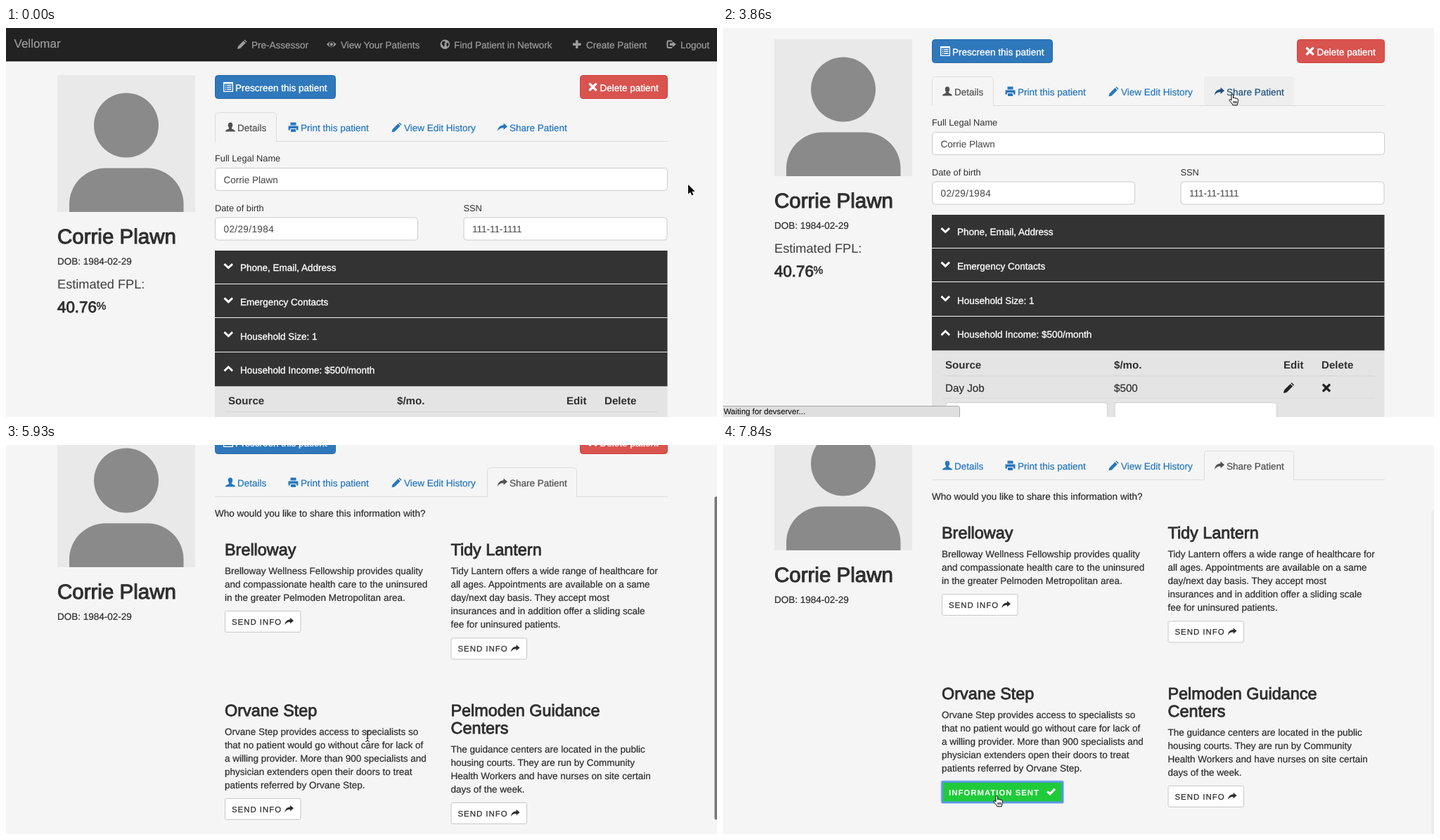
Animation of 1011 by 554 pixels, one loop 8000 ms. Source, as an HTML page:

```html
<!DOCTYPE html>
<html lang="en">
<head>
<meta charset="utf-8">
<title>Patient sharing</title>
<style>
  html, body { margin: 0; width: 100%; height: 100%; overflow: hidden; background: #f5f5f5; }
  svg { display: block; width: 100vw; height: 100vh; }
  text { font-family: "Liberation Sans", Arial, sans-serif; text-rendering: geometricPrecision; white-space: pre; }
</style>
</head>
<body>
<svg id="stage" viewBox="0 0 1011 554" xmlns="http://www.w3.org/2000/svg"></svg>
<script>
const LOOP = 8000;
const BG = '#f5f5f5', INK = '#2f2f2f', LINK = '#2677be', MUTED = '#9d9d9d';
const PERSON = 'Corrie Plawn';

// Icons live in a 14 x 14 box.
const ICONS = {
  pencil: 'M0 14L1 9.8L9 1.8L12.2 5L4.2 13ZM9.8 1L11 0L14 3L13 4.2Z',
  eye: 'M0 7Q7-1.5 14 7Q7 15.5 0 7ZM7 3.4A3.6 3.6 0 1 0 7 10.6A3.6 3.6 0 1 0 7 3.4ZM7 4.8A2.2 2.2 0 1 0 7 9.2A2.2 2.2 0 1 0 7 4.8Z',
  globe: 'M7 0A7 7 0 1 0 7 14A7 7 0 1 0 7 0ZM3 3L6 2L8 4L6 5.5L6.5 8L5 11L3.5 8L2 6ZM9.5 5H12L12.5 8L10 11L9 8Z',
  plus: 'M5.2 1H8.8V5.2H13V8.8H8.8V13H5.2V8.8H1V5.2H5.2Z',
  exit: 'M8 1H2.5Q0 1 0 3.5V10.5Q0 13 2.5 13H8V11H3Q2 11 2 10V4Q2 3 3 3H8ZM8.5 2.8L14 7L8.5 11.2V8.8H4.5V5.2H8.5Z',
  list: 'M0 0H14V14H0ZM1.3 2.5V12.7H12.7V2.5Z' +
    [4, 6.8, 9.6].map(y => `M2.8 ${y}h1.4v1.3h-1.4zM5.2 ${y}h6.2v1.3h-6.2z`).join(''),
  cross: 'M3 .8L7 4.6L11 .8L13.2 3L9.4 7L13.2 11L11 13.2L7 9.4L3 13.2L.8 11L4.6 7L.8 3Z',
  user: 'M7 0C9.4 0 10.4 1.8 10.2 4C10 6.2 9 7.2 8.8 8.4C9.5 9.8 14 10 14 13H0C0 10 4.5 9.8 5.2 8.4C5 7.2 4 6.2 3.8 4C3.6 1.8 4.6 0 7 0Z',
  print: 'M3 0H11V4H3ZM0 5H14V11H11.5V8.5H2.5V11H0ZM3.5 9.5H10.5V13.5H3.5Z',
  share: 'M8.5 1L14 5.8L8.5 10.6V7.8C4.5 7.6 2 9 0 12.5C.2 7.5 3.5 4 8.5 3.8Z',
  down: 'M2 2.5L7 7.2L12 2.5L14 4.8L7 11.5L0 4.8Z',
  up: 'M2 11.5L7 6.8L12 11.5L14 9.2L7 2.5L0 9.2Z',
  check: 'M0 7.5L2.4 5L5.2 7.8L11.6 1.4L14 3.8L5.2 12.6Z'
};

const icon = (name, x, y, fill = INK, size = 14) =>
  `<path d="${ICONS[name]}" fill="${fill}" fill-rule="evenodd" transform="translate(${x} ${y}) scale(${size / 14})"/>`;

// heavy: outline width that thickens the strokes of the letters
const text = (x, y, str, size = 13.5, fill = INK, heavy = .22, extra = '') =>
  `<text x="${x}" y="${y}" font-size="${size}" fill="${fill}"` +
  (heavy ? ` stroke="${fill}" stroke-width="${heavy}"` : '') + ` ${extra}>${str}</text>`;

const rect = (x, y, w, h, fill, extra = '') =>
  `<rect x="${x}" y="${y}" width="${w}" height="${h}" fill="${fill}" ${extra}/>`;

// Bordered box whose outer edge is the given rectangle.
const box = (x, y, w, h, fill, line, r = 4, extra = '') =>
  rect(x + .5, y + .5, w - 1, h - 1, fill, `stroke="${line}" rx="${r}" ${extra}`);

const rule = (x1, x2, y, color) => rect(x1, y, x2 - x1, 1, color);

function header() {
  const nav = [
    ['pencil', 329, 349, 'Pre-Assessor'], ['eye', 456, 476, 'View Your Patients'],
    ['globe', 617.5, 637, 'Find Patient in Network'], ['plus', 805, 825, 'Create Patient'],
    ['exit', 939.5, 959, 'Logout']
  ];
  return rect(0, 0, 1011, 47, '#222') + rule(0, 1011, 46.5, '#0c0c0c') +
    text(11.5, 28, 'Vellomar', 17, MUTED) +
    nav.map(([i, ix, x, s]) => icon(i, ix, 16.5, MUTED, 13.5) + text(x, 28.7, s, 13.5, MUTED)).join('') +
    rect(73, 67, 196, 195, '#e9e9e9') +
    '<circle cx="171" cy="138.5" r="46" fill="#8a8a8a"/>' +
    '<path d="M90 262V251A51.5 51.5 0 0 1 141.5 199.5H201A51.5 51.5 0 0 1 252.5 251V262Z" fill="#8a8a8a"/>' +
    text(73, 307, PERSON, 29.5, INK, 1.05) +
    text(73, 336.5, 'DOB: 1984-02-29') +
    box(297, 67, 172, 34, '#2f78bc', '#2a68a2') + icon('list', 309, 77, '#fff') +
    text(326, 90, 'Prescreen this patient', 13.5, '#fff', .35) +
    box(816, 67, 125, 34, '#d9534f', '#d43f3a') + icon('cross', 827.5, 77, '#fff') +
    text(844.5, 90, 'Delete patient', 13.5, '#fff', .35);
}

function tabs(active) {
  const items = [
    ['user', 312, 329, 'Details', 297, 88], ['print', 401.5, 419, 'Print this patient', 386, 146],
    ['pencil', 548.5, 566, 'View Edit History', 533, 150], ['share', 699, 716, 'Share Patient', 684, 128]
  ];
  return rule(297, 941, 161, '#ddd') + items.map(([i, ix, x, s, left, w], n) => {
    const on = n === active, c = on ? '#505050' : LINK;
    const frame = on ? `<path d="M${left + .5} 162V124.5q0-4 4-4h${w - 9}q4 0 4 4V162" fill="${BG}" stroke="#ddd"/>` : '';
    return frame + icon(i, ix, 134.5, c) + text(x, 147, s, 13.5, c);
  }).join('');
}

function details() {
  const field = (x, y, w, s, extra) =>
    box(x, y, w, 33, '#fff', '#ccc') + text(x + 12.5, y + 21.5, s, 13.5, '#505050', .1, extra);
  const label = (x, y, s) => text(x, y, s, 12.8, INK, 0);
  const rows = ['Phone, Email, Address', 'Emergency Contacts', 'Household Size: 1', 'Household Income: $500/month'];
  const heads = [[316, 'Source'], [556, '$/mo.'], [797, 'Edit'], [851, 'Delete']];
  return text(73, 371, 'Estimated FPL:', 18.2, '#3c3c3c', 0) +
    text(73, 405, '40.76', 22.3, INK, .9) + text(128.5, 400.5, '%', 15.5, INK, .5) +
    tabs(0) +
    '<g id="hover">' + rect(684, 120, 128, 41, '#eee', 'rx="4"') +
    icon('share', 699, 134.5, '#23527c') + text(716, 147, 'Share Patient', 13.5, '#23527c') + '</g>' +
    label(297, 190, 'Full Legal Name') + field(297, 199, 644, PERSON) +
    label(297, 260.5, 'Date of birth') + field(297, 269.5, 289, '02/29/1984', 'letter-spacing=".4"') +
    label(650.5, 260.5, 'SSN') + field(650.5, 269.5, 290, '111-11-1111') +
    rect(297, 317, 643.5, 193.5, '#333') +
    rows.map((s, n) => {
      const y = 317 + 48.6 * n;
      return (n ? rule(297, 940.5, Math.round(y) - 2, '#f2f2f2') : '') +
        icon(n < 3 ? 'down' : 'up', 309.5, y + 15.5, '#fff', 13.5) + text(333, y + 29.3, s, 13.5, '#fff', .35);
    }).join('') +
    rect(297, 510.5, 643.5, 620, '#e4e4e4') +
    heads.map(([x, s]) => text(x, 536, s, 15.1, INK, 0, 'font-weight="bold"')).join('') +
    rule(312, 926, 546, '#d6d6d6') +
    text(316, 568.5, 'Day Job', 15.2) + text(556, 568.5, '$500', 15.2) +
    icon('pencil', 797, 556, '#222', 15) + icon('cross', 851, 556.5, '#222') +
    rule(312, 926, 577.5, '#dadada') +
    box(316, 584, 231, 33, '#fff', '#ccc') + box(556.5, 584, 231.5, 33, '#fff', '#ccc');
}

function send(x, y, id = '') {
  return box(x, y, 108.5, 31, '#fff', '#c8c8c8', 2, id && `id="${id}"`) +
    text(x + 10, y + 19.7, 'SEND INFO', 11.4, INK, .25, 'letter-spacing="1"') +
    icon('share', x + 85.5, y + 9, INK, 12.5);
}

function share() {
  const lines = (x, y, arr) => arr.map((s, n) => text(x, y + 19 * n, s)).join('');
  const head = (x, y, s) => text(x, y, s, 23.4, INK, .85);
  return tabs(3) +
    text(297, 190, 'Who would you like to share this information with?') +
    head(311, 244.5, 'Brelloway') +
    lines(311, 272, ['Brelloway Wellness Fellowship provides quality',
      'and compassionate health care to the uninsured', 'in the greater Pelmoden Metropolitan area.']) +
    send(311, 324) +
    head(632.5, 244.5, 'Tidy Lantern') +
    lines(632.5, 272, ['Tidy Lantern offers a wide range of healthcare for',
      'all ages. Appointments are available on a same', 'day/next day basis. They accept most',
      'insurances and in addition offer a sliding scale', 'fee for uninsured patients.']) +
    send(632.5, 362.5) +
    head(311, 473.5, 'Orvane Step') +
    lines(311, 501, ['Orvane Step provides access to specialists so',
      'that no patient would go without care for lack of', 'a willing provider. More than 900 specialists and',
      'physician extenders open their doors to treat', 'patients referred by Orvane Step.']) +
    '<g id="idle">' + send(311, 591, 'press') + '</g>' +
    '<g id="sent">' + rect(309.5, 589.5, 175.5, 33.5, '#a9c8f3', 'rx="3"') +
    rect(310.5, 590.5, 173.5, 31.5, '#5b97e6', 'rx="2"') + rect(313, 593, 168.5, 26.5, '#20cb3a') +
    text(321, 610.7, 'INFORMATION SENT', 11.4, '#fff', 0, 'font-weight="bold" letter-spacing="1"') +
    icon('check', 460, 599.5, '#fff', 13) + '</g>' +
    head(632.5, 473.5, 'Pelmoden Guidance') + head(632.5, 498.5, 'Centers') +
    lines(632.5, 525.5, ['The guidance centers are located in the public',
      'housing courts. They are run by Community', 'Health Workers and have nurses on site certain', 'days of the week.']) +
    send(632.5, 597);
}

const pointers =
  '<path id="arrow" d="M0 0V13.6L3.1 10.7L5.2 15.5L7.5 14.5L5.4 9.8H9.7Z" fill="#000" stroke="#fff" stroke-width="1.4" paint-order="stroke"/>' +
  '<path id="hand" d="M4 9V1.8A1.3 1.3 0 0 1 6.6 1.8V6A1.3 1.3 0 0 1 9 6.3A1.3 1.3 0 0 1 11.3 7A1.2 1.2 0 0 1 13.4 7.8V10.5C13.4 12.5 12.3 13.5 12.2 15.8H5.8C5.5 13.8 3 11.8 1 9.2C.3 8 1.7 7.2 2.6 8ZM7 10V13.4M9 10V13.4M11 10V13.4" fill="#fff" stroke="#000"/>' +
  '<path id="beam" d="M-3-7.5Q0-7.5 0-5Q0-7.5 3-7.5M0-5V5M-3 7.5Q0 7.5 0 5Q0 7.5 3 7.5M-1.5 2.5H1.5" fill="none" stroke="#222"/>';

document.getElementById('stage').innerHTML =
  rect(0, 0, 1011, 554, BG) +
  `<g id="page">${header()}<g id="details">${details()}</g><g id="share">${share()}</g></g>` +
  rect(1007.5, 0, 5, 10, '#777', 'id="thumb" rx="2"') +
  '<g id="status"><path d="M-1 538.5H333.5Q336.5 538.5 336.5 541.5V555H-1Z" fill="#dfdfdf" stroke="#a9a9a9"/>' +
  text(1, 550, '', 11.4, '#111', .1, 'id="note"') + '</g>' +
  `<g id="pointer">${pointers}</g>`;

// Step tables: each row holds from its time until the next row.
const SCROLL = [[0, 0], [1040, 3], [1190, 14], [1340, 31], [1490, 45], [1640, 51], [4010, 0],
  [5640, 3], [5790, 42], [5930, 88], [6080, 111], [6220, 115], [6370, 114], [6520, 113], [6660, 112]];
const THUMB = [[0, 0], [1190, 1], [3420, 0], [5790, 1], [7550, .6], [7700, .3], [7840, .07]];
const STATUS = [[0, '', 0], [1490, 'devserver:8040/lookup_all', 1], [2230, '', 0],
  [2530, 'devserver:8040/share_form', 1], [3860, 'Waiting for devserver...', 1],
  [4310, 'Waiting for devserver...', .5], [4460, '', 0]];
const HOVER = [[0, 0], [2530, 1], [4010, 0]];
const PRESS = [[0, '#fff', '#c8c8c8'], [6960, '#e6e6e6', '#adadad'], [7550, '#dcdcdc', '#5b97e6'], [7700, '', '']];
const POINTER = [[0, 'arrow', 970, 223], [1040, 'hand', 966, 223], [1190, 'arrow', 970, 223],
  [1930, 'arrow', 962, 205], [2080, 'arrow', 941, 165], [2230, 'arrow', 862, 84], [2380, 'arrow', 792, 42],
  [2530, 'hand', 742, 76], [2670, 'hand', 719, 94], [4900, 'arrow', 700, 132], [5050, 'arrow', 625, 246],
  [5190, 'arrow', 545, 372], [5340, 'arrow', 513, 415], [5790, 'beam', 514, 415], [6520, 'beam', 510, 425],
  [6660, 'beam', 499, 441], [6810, 'beam', 455, 464], [6960, 'hand', 400, 488], [7100, 'hand', 384, 499]];

const at = (track, t) => track.filter(row => row[0] <= t).pop();
const el = id => document.getElementById(id);
const show = (id, on) => el(id).setAttribute('visibility', on ? 'inherit' : 'hidden');

function draw(t) {
  const y = at(SCROLL, t)[1], sharing = t >= 4010;
  el('page').setAttribute('transform', `translate(0 ${-y})`);
  show('details', !sharing);
  show('share', sharing);
  show('hover', !sharing && at(HOVER, t)[1]);

  const top = y * (sharing ? .835 : .49);
  el('thumb').setAttribute('y', top);
  el('thumb').setAttribute('height', sharing ? Math.min(460, 553.5 - top) : 272);
  el('thumb').setAttribute('opacity', at(THUMB, t)[1]);

  const [, note, alpha] = at(STATUS, t);
  el('note').textContent = note;
  el('status').setAttribute('opacity', alpha);

  const [, fill, line] = at(PRESS, t);
  show('idle', fill);
  show('sent', !fill);
  el('press').setAttribute('fill', fill || '#fff');
  el('press').setAttribute('stroke', line || '#c8c8c8');

  const [, kind, px, py] = at(POINTER, t);
  for (const k of ['arrow', 'hand', 'beam']) show(k, k === kind);
  el('pointer').setAttribute('transform', `translate(${px} ${py})`);
}

const start = performance.now();
function tick() {
  draw((performance.now() - start) % LOOP);
  requestAnimationFrame(tick);
}
tick();
</script>
</body>
</html>
```
